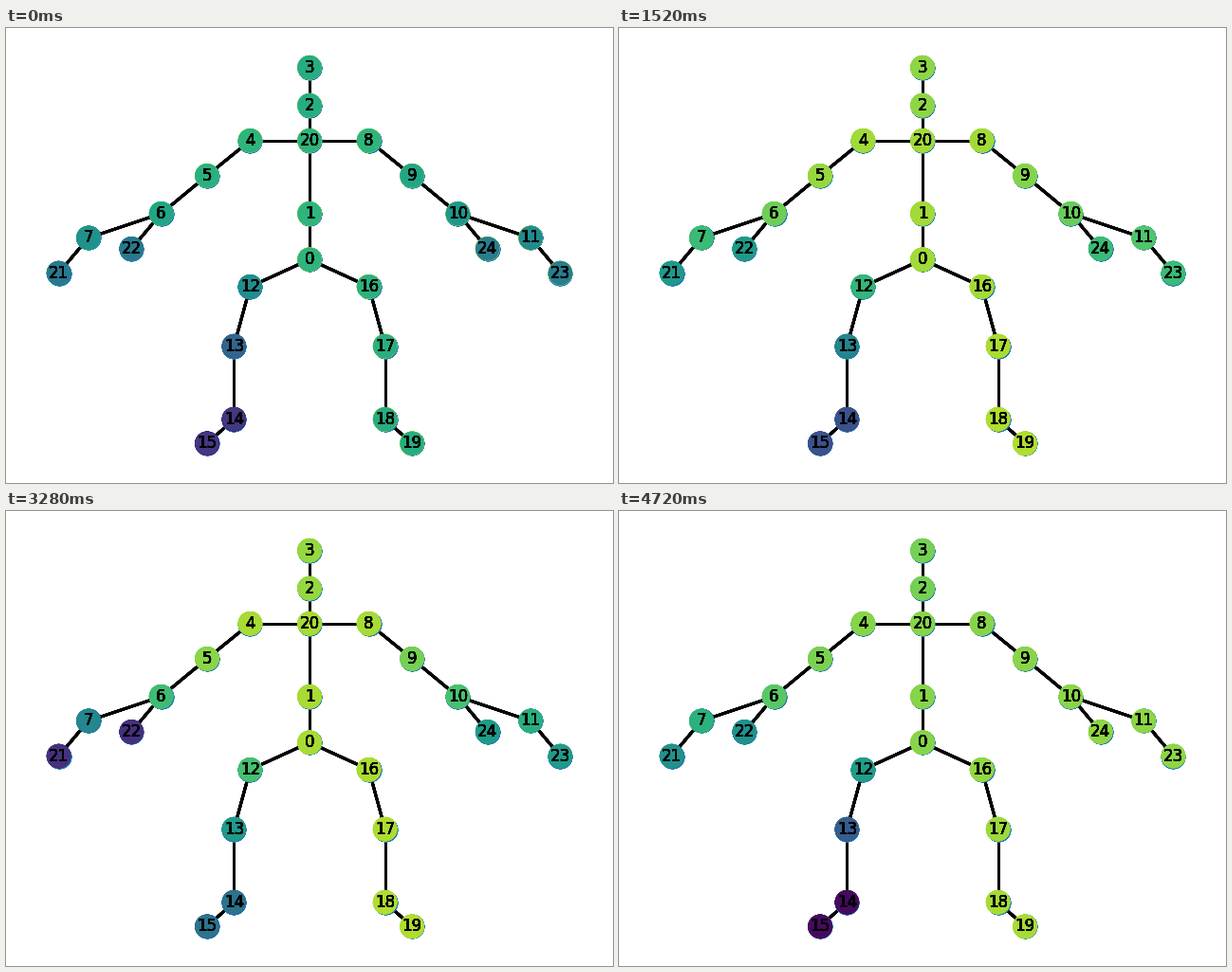
A matplotlib script that plays this animation: 640 px wide and 480 px high, repeating every 4800 ms.

```python
import numpy as np
import matplotlib.pyplot as plt
from matplotlib.animation import FuncAnimation
from matplotlib.collections import LineCollection

W, H, DPI = 640, 480, 100
FRAMES, INTERVAL = 60, 80
REST_COLOR = "#1f78b4"

# Skeleton on an integer grid: x from the spine, y down from the head.
GRID_W, GRID_H, PAD = 186, 139, 1.21
SPINE = {3: 0, 2: 14, 20: 27, 1: 54, 0: 71}
SIDE = {4: (22, 27), 5: (38, 40), 6: (55, 54), 7: (82, 63), 21: (93, 76),
        22: (66, 67), 12: (22, 81), 13: (28, 103), 14: (28, 130), 15: (38, 139)}
MIRROR = {4: 8, 5: 9, 6: 10, 7: 11, 21: 23, 22: 24,
          12: 16, 13: 17, 14: 18, 15: 19}
CHAINS = [(3, 2, 20, 1, 0), (20, 4, 5, 6, 7, 21), (6, 22), (0, 12, 13, 14, 15)]

# Activation of the trunk and the limb tips; the rest is eased between them.
KEY_TIMES = [0, 6, 19, 33, 41, 50, 59]
TRUNK = [.65, .93, .86, .77, .87, .83, .82]
# Each limb: joints from trunk to tip, easing power, tip activation.
LIMBS = [
    ((4, 5, 6, 7, 21), 2, [.40, .50, .54, .20, .14, .65, .50]),
    ((8, 9, 10, 11, 23), 1, [.42, .63, .68, .63, .55, .77, .83]),
    ((0, 12, 13, 14), 1, [.16, .19, .25, .02, .38, .10, .03]),
    ((0, 16, 17, 18), 1, [.62, .88, .88, .86, .88, .86, .87]),
]
TWINS = {22: 21, 24: 23, 15: 14, 19: 18}
HEAD_DIP = .03


def joint_positions():
    dx, dy = W / PAD / GRID_W, H / PAD / GRID_H
    top = H / 2 * (1 - 1 / PAD)
    pos = {j: (W / 2, top + y * dy) for j, y in SPINE.items()}
    for j, (x, y) in SIDE.items():
        pos[j] = (W / 2 - x * dx, top + y * dy)
        pos[MIRROR[j]] = (W / 2 + x * dx, top + y * dy)
    return pos


def colors(frame):
    frame %= FRAMES
    trunk = np.interp(frame, KEY_TIMES, TRUNK)
    level = np.full(25, trunk)
    level[[2, 3]] -= HEAD_DIP
    for joints, power, tips in LIMBS:
        tip = np.interp(frame, KEY_TIMES, tips)
        for j, u in zip(joints, np.linspace(0, 1, len(joints))):
            level[j] = trunk + (tip - trunk) * u ** power
    for j, twin in TWINS.items():
        level[j] = level[twin]
    return plt.cm.viridis(level)


fig = plt.figure(figsize=(W / DPI, H / DPI), dpi=DPI, facecolor="white")
ax = fig.add_axes([0, 0, 1, 1])
ax.set_xlim(0, W)
ax.set_ylim(H, 0)
ax.axis("off")

pos = joint_positions()
xs, ys = zip(*(pos[j] for j in range(25)))

bones = []
for chain in CHAINS:
    for joints in (chain, [MIRROR.get(j, j) for j in chain]):
        bones += [(pos[a], pos[b]) for a, b in zip(joints, joints[1:])]


def discs(color, zorder):
    return ax.scatter(xs, ys, s=300, c=color, linewidths=1, zorder=zorder)


# Overprinting hardens the edges and leaves a rim of the earlier colours.
for _ in range(12):
    ax.add_collection(LineCollection(bones, colors="black", linewidths=2, zorder=1))
    discs(REST_COLOR, 2)
older = [discs(colors(-1), 3) for _ in range(6)]
current = discs(colors(0), 4)

for j in range(25):
    for _ in range(10):
        ax.text(*pos[j], str(j), size=12, family="DejaVu Sans", color="black",
                ha="center", va="center", zorder=5)


def update(frame):
    for layer in older:
        layer.set_color(colors(frame - 1))
    current.set_color(colors(frame))
    return [*older, current]


anim = FuncAnimation(fig, update, frames=FRAMES, interval=INTERVAL,
                     repeat=True, repeat_delay=0, blit=False)
plt.show()
```
